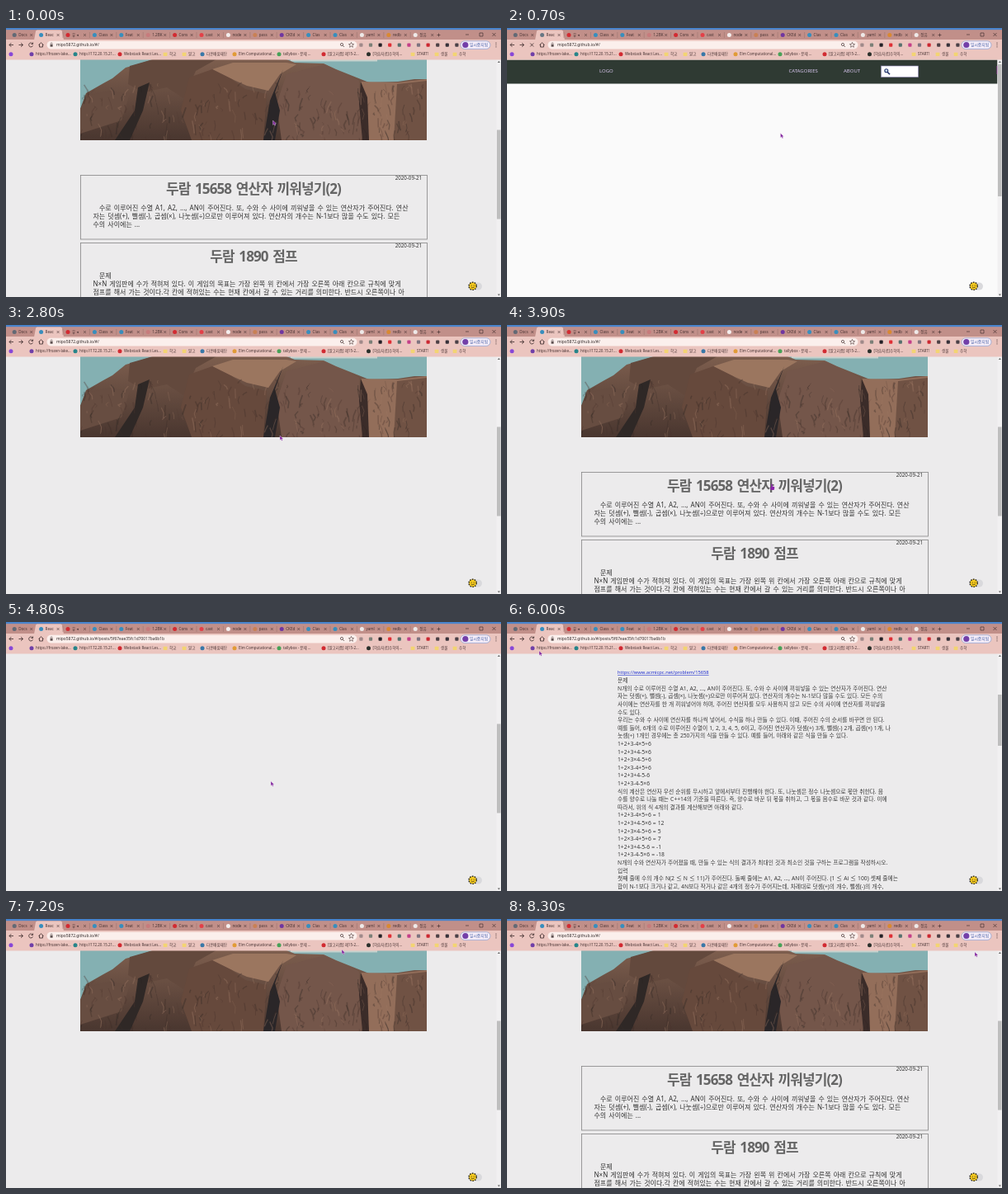
Recreate the animation shown at these times as an HTML page. Size 600 by 326 pixels, loop 8.4 s.

```html
<!DOCTYPE html>
<html lang="ko">
<head>
<meta charset="utf-8">
<style>
html, body { margin: 0; width: 100%; height: 100%; overflow: hidden; background: #ecebec; }
svg { display: block; width: 600px; height: 326px; font-family: "Noto Sans", "Noto Sans CJK KR", "Noto Sans CJK", sans-serif; }
</style>
</head>
<body>
<svg id="stage" viewBox="0 0 600 326"></svg>
<script>
const stage = document.getElementById('stage');

function add(parent, tag, attrs, content) {
  const el = document.createElementNS('http://www.w3.org/2000/svg', tag);
  for (const key in attrs) el.setAttribute(key, attrs[key]);
  if (content) el.textContent = content;
  parent.append(el);
  return el;
}
const group = (parent = stage) => add(parent, 'g', {});
const rect = (p, x, y, width, height, fill, more) => add(p, 'rect', { x, y, width, height, fill, ...more });
const dot = (p, cx, cy, r, fill, more) => add(p, 'circle', { cx, cy, r, fill, ...more });
const shape = (p, d, fill, more) => add(p, 'path', { d, fill, ...more });
const line = (p, d, stroke = '#4b3838', width = 0.9) =>
  add(p, 'path', { d, fill: 'none', stroke, 'stroke-width': width });
// y is the middle of the line of text
const text = (p, x, y, size, fill, str, more) =>
  add(p, 'text', { x, y: y + size * 0.36, 'font-size': size, fill, ...more }, str);

let seed = 7;
const random = () => (seed = seed * 16807 % 2147483647) / 2147483647;

// Page background
const paper = rect(stage, 0, 38, 600, 288, '#ecebec');

// Top of the page while reloading
const header = group();
rect(header, 0, 38.5, 594.5, 29, '#2f3a33');
text(header, 112, 52, 6, '#d8c6ee', 'LOGO');
text(header, 341.5, 52, 6, '#d8c6ee', 'CATAGORIES');
text(header, 408, 52, 6, '#d8c6ee', 'ABOUT');
rect(header, 453.5, 46, 45, 13.5, '#fff', { stroke: '#8d83b5', 'stroke-width': 0.6 });
dot(header, 459.8, 51.8, 2, '#c4d6ea', { stroke: '#28366d', 'stroke-width': 1.1 });
line(header, 'M461.2 53.4L464 56.2', '#28366d', 1.6);
rect(header, 593.6, 46, 1, 10, '#a13ba5');

// Rocks by the sea
const photo = group();
const clip = add(photo, 'clipPath', { id: 'frame' });
rect(clip, 90, 38, 420, 98, '#000');
const fade = add(photo, 'linearGradient', { id: 'rock', x1: 0, y1: 0, x2: 0, y2: 1 });
add(fade, 'stop', { offset: 0, 'stop-color': '#7d5e4e' });
add(fade, 'stop', { offset: 1, 'stop-color': '#49362f' });
const view = add(photo, 'g', { 'clip-path': 'url(#frame)' });
rect(view, 90, 38, 420, 98, '#84b0b2');
rect(view, 345, 38, 105, 2.5, '#c5d2cd');
shape(view, 'M90 136V98L97 79L118 67L129 61L145 48L163 43L178 38H340L350 42L385 43L400 50L430 62L440 66L475 65L495 62H510V136Z', 'url(#rock)');
shape(view, 'M178 38H255L230 52L215 85L195 72L166 78L148 68L150 46Z', '#63493d');
shape(view, 'M250 50L275 42H340L352 44L332 56L318 76L292 70L274 62Z', '#9b765f');
shape(view, 'M222 60L250 50L274 62L290 74L316 80L312 136H225L212 100Z', '#66493c');
shape(view, 'M340 56L386 44L428 64L434 136H334L328 92Z', '#74564a');
shape(view, 'M430 65L475 66L510 62V136H440Z', '#936e5a');
shape(view, 'M474 68L510 64V136H470Z', '#705244');
shape(view, 'M160 72L174 66L166 100L150 136H132L156 100Z', '#2f2826');
shape(view, 'M336 50L326 78L332 100L326 136H312L320 88Z', '#2a2628');
shape(view, 'M430 65L438 84L440 136H432L428 92Z', '#3b2c29');
shape(view, 'M90 98L99 82L126 76L150 80L140 112L90 128Z', '#674d41');
const tones = ['#2c2422', '#3a2a26', '#a17c66', '#4a352d'];
for (let i = 0; i < 240; i++) {
  const x = 92 + random() * 416, y = 66 + random() * 68, tall = 3 + random() * 13;
  line(view, `M${x} ${y}l${random() * 8 - 4} ${tall / 2}l${random() * 4 - 2} ${tall / 2}`,
    tones[i % 4], 0.5 + random() * 1.3).setAttribute('opacity', 0.35);
}

// Post previews
const cards = group();
function card(y, title, rows) {
  rect(cards, 90.5, y + 0.5, 420, 77.5, 'none', { stroke: '#858585', 'stroke-width': 0.8 });
  text(cards, 504, y + 4.2, 6.2, '#333', '2020-09-21', { 'text-anchor': 'end' });
  text(cards, 300, y + 17, 17, '#656565', title,
    { 'text-anchor': 'middle', 'font-weight': 700, 'letter-spacing': -0.9, 'word-spacing': 2 });
  rows.forEach(([indent, dy, str]) =>
    text(cards, 105.5 + indent, y + dy, 8, '#333', str, { 'word-spacing': 1 }));
}
card(178, '두람 15658 연산자 끼워넣기(2)', [
  [7.5, 40, '수로 이루어진 수열 A1, A2, ..., AN이 주어진다. 또, 수와 수 사이에 끼워넣을 수 있는 연산자가 주어진다. 연산'],
  [0, 50, '자는 덧셈(+), 뺄셈(-), 곱셈(×), 나눗셈(÷)으로만 이루어져 있다. 연산자의 개수는 N-1보다 많을 수도 있다. 모든'],
  [0, 60, '수의 사이에는 ...']
]);
card(260, '두람 1890 점프', [
  [7.5, 40, '문제'],
  [0, 50, 'N×N 게임판에 수가 적혀져 있다. 이 게임의 목표는 가장 왼쪽 위 칸에서 가장 오른쪽 아래 칸으로 규칙에 맞게'],
  [0, 60, '점프를 해서 가는 것이다.각 칸에 적혀있는 수는 현재 칸에서 갈 수 있는 거리를 의미한다. 반드시 오른쪽이나 아'],
  [0, 70, '래쪽으로만 이동해야 한다. ...']
]);

// Full post
const post = group();
const sums = ['1+2+3-4×5÷6', '1÷2+3+4-5×6', '1+2÷3×4-5+6', '1÷2×3-4+5+6', '1+2+3+4-5-6', '1+2+3-4-5×6'];
const answers = [1, 12, 5, 7, -1, -18];
[
  'https://www.acmicpc.net/problem/15658',
  '문제',
  'N개의 수로 이루어진 수열 A1, A2, ..., AN이 주어진다. 또, 수와 수 사이에 끼워넣을 수 있는 연산자가 주어진다. 연산',
  '자는 덧셈(+), 뺄셈(-), 곱셈(×), 나눗셈(÷)으로만 이루어져 있다. 연산자의 개수는 N-1보다 많을 수도 있다. 모든 수의',
  '사이에는 연산자를 한 개 끼워넣어야 하며, 주어진 연산자를 모두 사용하지 않고 모든 수의 사이에 연산자를 끼워넣을',
  '수도 있다.',
  '우리는 수와 수 사이에 연산자를 하나씩 넣어서, 수식을 하나 만들 수 있다. 이때, 주어진 수의 순서를 바꾸면 안 된다.',
  '예를 들어, 6개의 수로 이루어진 수열이 1, 2, 3, 4, 5, 6이고, 주어진 연산자가 덧셈(+) 3개, 뺄셈(-) 2개, 곱셈(×) 1개, 나',
  '눗셈(÷) 1개인 경우에는 총 250가지의 식을 만들 수 있다. 예를 들어, 아래와 같은 식을 만들 수 있다.',
  ...sums,
  '식의 계산은 연산자 우선 순위를 무시하고 앞에서부터 진행해야 한다. 또, 나눗셈은 정수 나눗셈으로 몫만 취한다. 음',
  '수를 양수로 나눌 때는 C++14의 기준을 따른다. 즉, 양수로 바꾼 뒤 몫을 취하고, 그 몫을 음수로 바꾼 것과 같다. 이에',
  '따라서, 위의 식 4개의 결과를 계산해보면 아래와 같다.',
  ...sums.map((s, i) => `${s} = ${answers[i]}`),
  'N개의 수와 연산자가 주어졌을 때, 만들 수 있는 식의 결과가 최대인 것과 최소인 것을 구하는 프로그램을 작성하시오.',
  '입력',
  '첫째 줄에 수의 개수 N(2 ≤ N ≤ 11)가 주어진다. 둘째 줄에는 A1, A2, ..., AN이 주어진다. (1 ≤ Ai ≤ 100) 셋째 줄에는',
  '합이 N-1보다 크거나 같고, 4N보다 작거나 같은 4개의 정수가 주어지는데, 차례대로 덧셈(+)의 개수, 뺄셈(-)의 개수,'
].forEach((str, i) => text(post, 134, 61.2 + i * 9.6, i ? 6.75 : 5.75, i ? '#3a3a3a' : '#2433d0', str,
  i ? { 'word-spacing': 0.3 } : { 'text-decoration': 'underline' }));

// Theme switch
rect(stage, 560, 308.5, 17, 9, '#d9d9dc', { rx: 4.5 });
dot(stage, 565.7, 312.8, 4.6, '#f6cb1f', { stroke: '#25221a', 'stroke-width': 1.4, 'stroke-dasharray': '1.6 1.3' });
dot(stage, 564.2, 312, 0.6, '#3a2b10');
dot(stage, 567.2, 312, 0.6, '#3a2b10');
line(stage, 'M563.7 314q2 1.6 4 0', '#3a2b10', 0.7);

// Scrollbar
rect(stage, 594.5, 38, 5.5, 288, '#f1f0f1');
const thumb = rect(stage, 595, 44, 4.6, 160, '#bebebe');
shape(stage, 'M595.8 42l1.6-2l1.6 2zM595.8 322.5l1.6 2l1.6-2z', '#666');

// Browser window
rect(stage, 0, 0, 600, 14, '#c18f89');
rect(stage, 0, 0, 600, 2.2, '#4a84cb');
rect(stage, 0, 14, 600, 24.5, '#ebc5bf');
shape(stage, 'M34 14.5L36 4q.3-1.5 2-1.5H66q1.7 0 2 1.5L70 14.5Z', '#ebc5bf');
const blue = '#388ebd', red = '#d22b32', ink = '#493434';
const tabs = [
  ['Docs', '#626975'], ['Reac', blue], ['유 ◂', red], ['Class', blue], ['Feat', blue], ['1.2BK', '#c77b7c'],
  ['Cons', red], ['cast', '#e34048'], ['node', '#f4eeee'], ['pass', '#c98055'], ['CKEd', '#7036a0'], ['Clas', blue],
  ['Clas', blue], ['yaml', '#eee9e8'], ['redb', '#d98932'], ['정유', '#eee9e8']
];
let tabIcon;
tabs.forEach(([name, color], i) => {
  const x = 10.2 + i * 32.4;
  const icon = dot(stage, x, 8.6, 2.5, color);
  if (i === 1) tabIcon = icon;
  text(stage, x + 5, 8.6, 4.6, ink, name);
  line(stage, `M${x + 19} 7l3 3m0-3l-3 3`, ink, 0.6);
  if (i > 1) line(stage, `M${x - 6} 5v7`, '#94706b', 0.5);
});
line(stage, 'M522.5 8.5h4m-2-2v4M557 8h4M574 6h4v4h-4zM589.5 6l4 4m0-4l-4 4', ink, 0.7);

line(stage, 'M9 20.5H4m2.3-2.4L4 20.5l2.3 2.4M15.5 20.5h5m-2.3-2.4l2.3 2.4l-2.3 2.4M39.5 20.5l3-2.7l3 2.7M40.5 20v3h4v-3');
const reload = line(stage, 'M32.2 19a2.5 2.5 0 1 0 .3 2.4M32.6 17.5v2h-2');
const stop = line(stage, 'M28.2 18.5l4 4m0-4l-4 4');
rect(stage, 49.5, 15.8, 376, 9.6, '#fbefec', { rx: 4.8 });
rect(stage, 53.6, 20, 3, 2.7, '#5d5050');
line(stage, 'M54.2 20v-1.3a.9.9 0 0 1 1.8 0V20', '#5d5050', 0.6);
const url = text(stage, 61, 20.5, 4.9, '#332b2b', '/');
dot(stage, 407, 20, 1.6, 'none', { stroke: ink, 'stroke-width': 0.7 });
line(stage, 'M408.2 21.2l1.8 1.8', ink, 0.7);
shape(stage, 'M418.5 17.4l.9 2l2.2.2l-1.7 1.5l.5 2.2l-1.9-1.2l-1.9 1.2l.5-2.2l-1.7-1.5l2.2-.2z', 'none', { stroke: ink, 'stroke-width': 0.6 });
['#a08a8a', '#7c8078', '#232126', '#df3036', '#55716e', '#c44089', '#7d7380', '#cb2831', '#4d4145', '#38323a', '#4b4147']
  .forEach((color, i) => rect(stage, 428.3 + i * 11.6, 18.5, 4.2, 4.2, color, { rx: 1 }));
rect(stage, 551, 15.8, 36, 9.6, '#f5edf8', { rx: 4.8, stroke: '#7894ce', 'stroke-width': 0.6 });
dot(stage, 556.8, 20.5, 3.6, '#7340a9');
text(stage, 562, 20.5, 4.8, '#4964a8', '일시중지됨');
for (const y of [18.2, 20.5, 22.8]) dot(stage, 594, y, 0.6, ink);

const folder = '#f3d473';
[
  [6, '#8847d7', ''], [31, '#7040a8', 'https://frozen-lake...'], [84, '#27858a', 'http://172.20.15.21...'],
  [138, red, 'Webstack React Les...'], [193, folder, '학교'], [216, folder, '알고'], [238, '#3978a8', '다온배움재단'],
  [277, '#e19b37', 'Elm Computational...'], [331, '#48a158', 'tallybox - 문제 ...'], [385, red, '[알고리즘] 제15-2...'],
  [439.5, '#2b302b', '[학습자료]수학의...'], [493, folder, 'START!'], [522, folder, '생물'], [544, folder, '수학']
].forEach(([x, color, name]) => {
  if (color === folder) rect(stage, x - 2.3, 29.7, 4.7, 4.3, color, { rx: 0.5 });
  else dot(stage, x, 31.8, 2.5, color);
  text(stage, x + 5, 31.8, 4.5, ink, name);
});

// Pointer
const pointer = group();
const arrow = shape(pointer, 'M0 0V5.4L1.3 4.3L2.2 6.2L3.2 5.7L2.4 4H4Z', '#81269d', { stroke: '#efe0f2', 'stroke-width': 0.35 });
const hand = shape(pointer, 'M-.7 0q.7-1 1.4 0v2.4l2 .5q.8.4.6 1.3L2.6 7h-3.4L-2.6 4.3q.5-1 1.9 0z', '#8b24ab');
const path = [
  [0, 323.5, 112], [700, 331.5, 127.5], [1600, 332, 134], [3500, 332, 134], [3800, 321, 193], [5400, 321, 193],
  [5600, 90, 72], [5700, 90, 72], [6000, 39, 35], [6200, 7, 21], [6600, 7, 21],
  [7200, 407, 37], [7500, 468, 40], [8300, 567, 40], [8400, 567, 40]
];
function pointerAt(t) {
  const i = path.findIndex((p, k) => k && t < p[0]);
  const [t0, x0, y0] = path[i - 1], [t1, x1, y1] = path[i];
  const k = (t - t0) / (t1 - t0);
  return [x0 + (x1 - x0) * k, y0 + (y1 - y0) * k];
}

const show = (el, on) => el.setAttribute('display', on ? 'inline' : 'none');
const home = 'mipo5872.github.io/#/';

function draw(now) {
  const t = Math.floor(now % 8400 / 100) * 100;
  const loading = t >= 400 && t < 1000;
  const reading = t >= 4100 && t < 6400;
  const full = reading && t >= 5100;
  show(header, loading);
  show(photo, !loading && !reading);
  show(cards, t < 400 || (t >= 3200 && t < 4100) || t >= 7600);
  show(post, full);
  show(reload, !loading);
  show(stop, loading);
  paper.setAttribute('fill', loading ? '#fafafa' : '#ecebec');
  tabIcon.setAttribute('fill', loading ? '#687784' : blue);
  thumb.setAttribute('y', loading ? 44 : full ? 88 : 123.5);
  thumb.setAttribute('height', loading ? 160 : full ? 62 : 108);
  url.textContent = home + (reading ? 'posts/5f67eae35fc1d70017ba6b1b' : '');
  const onTitle = t >= 3800 && t < 4100;
  show(hand, onTitle);
  show(arrow, !onTitle);
  pointer.setAttribute('transform', `translate(${pointerAt(t)})`);
  requestAnimationFrame(draw);
}
draw(0);
</script>
</body>
</html>
```
